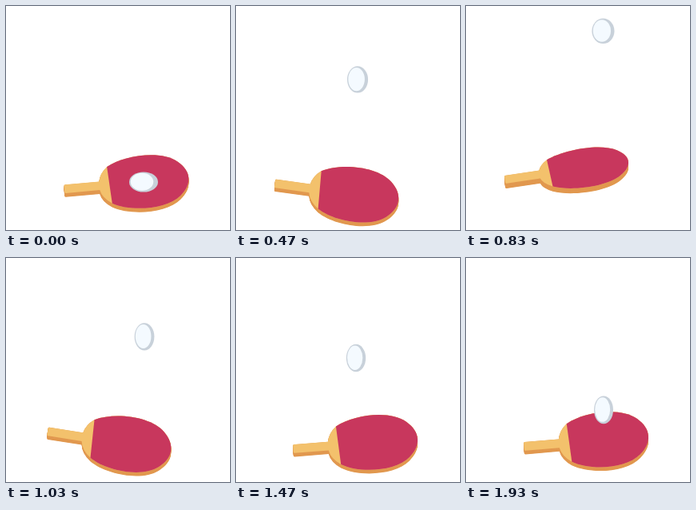
Animation of 280x280 px, one loop 1.96 s. Source, as an HTML page with a canvas:

```html
<!DOCTYPE html>
<html lang="en">
<head>
<meta charset="utf-8">
<title>Table tennis</title>
<style>
  html, body { margin: 0; width: 100%; height: 100%; overflow: hidden; background: #fff; }
  canvas { display: block; width: 280px; height: 280px; }
</style>
</head>
<body>
<canvas id="stage"></canvas>
<script>
const LOOP = 1960, STEP = 100 / 3, SIZE = 280, HIT_Y = 220;
const COLORS = { rubber: '#c8375d', wood: '#f3c16c', edge: '#e1984f', ball: '#f4faff', shade: '#c8d1da' };

// Ball: hit time and x, apex time and y. Paddle: x at the hit, high and low y, pull to the left.
const BOUNCES = [
  { hit: 0, ballX: 172, apex: 285, apexY: 42, x: 172.5, high: 192, low: 240, reach: 22 },
  { hit: 628, ballX: 152, apex: 874, apexY: 26, x: 168.5, high: 190, low: 234, reach: 22 },
  { hit: 1135, ballX: 173, apex: 1310, apexY: 71, x: 171, high: 184, low: 234, reach: 1 },
  { hit: 1570, ballX: 150, apex: 1710, apexY: 71, x: 172.5, high: 199, low: 227, reach: 2 }
];

const canvas = document.getElementById('stage');
const ratio = window.devicePixelRatio || 1;
canvas.width = canvas.height = SIZE * ratio;
const ctx = canvas.getContext('2d');

const clamp = u => Math.max(0, Math.min(1, u));
const smooth = u => { u = clamp(u); return u * u * (3 - 2 * u); };
const mix = (a, b, u) => a + (b - a) * u;

// The current bounce, its neighbours, and how far along it is
function phase(t) {
  const n = BOUNCES.length;
  const i = BOUNCES.findLastIndex(b => t >= b.hit);
  const now = BOUNCES[i], next = BOUNCES[(i + 1) % n], prev = BOUNCES[(i + n - 1) % n];
  const land = next.hit || LOOP;
  return { now, next, prev, land, p: (t - now.hit) / (land - now.hit) };
}

function ballPose(t) {
  const { now, next, land, p } = phase(t);
  const u = t < now.apex ? (now.apex - t) / (now.apex - now.hit) : (t - now.apex) / (land - now.apex);
  const y = mix(now.apexY, HIT_Y, u * u);
  const x = mix(now.ballX, next.ballX, 1 - (1 - p) ** 5);
  // Flat at the hit, tall in flight, rounder at the top of a long flight
  const squash = Math.max(clamp(1 - (t - now.hit) / 105), clamp(1 - (land - t) / 20));
  const round = (land - now.hit) / 230 * clamp(1 - 2.2 * u * u) * smooth((90 - now.apexY) / 40);
  const rx = 12 + 6 * squash + round;
  return { x, y, rx, ry: 15 + (15 - rx) * 0.8 };
}

// Quick upstroke around the hit, then a slow drop
function paddlePose(t) {
  const { now, next, prev, p } = phase(t);
  const rise = q => smooth((q + 0.05) / 0.17);
  let { low, high } = now, lift;
  if (p > 0.95) { lift = rise(p - 1); high = next.high; }
  else if (p < 0.15) { lift = rise(p); low = prev.low; }
  else lift = 1 - smooth((p - 0.15) / 0.73);

  const pull = smooth(p / 0.4) * smooth((1 - p) / 0.25);
  const lean = 0.8 * now.reach * pull * (1 - lift) ** 3;
  const flick = 0.7 * (200 - now.high) * pull * lift ** 2;
  return {
    x: mix(now.x, next.x, p) - now.reach * pull,
    y: mix(low, high, lift),
    tilt: -5.2 + lean - flick,
    half: 34.3 - 12.3 * smooth(lift)
  };
}

function bladeCurve(path, k) {
  path.bezierCurveTo(-20, -37 * k, 25, -38.5 * k, 44, -22 * k);
  path.bezierCurveTo(52, -15 * k, 56, -8 * k, 56, 0);
  path.bezierCurveTo(56, 8 * k, 52, 15 * k, 44, 22 * k);
  path.bezierCurveTo(25, 38.5 * k, -20, 37 * k, -42, 24 * k);
}

function bodyPath(k) {
  const p = new Path2D(), h = 4 + 1.4 * k;
  p.moveTo(-98.5, -h);
  p.lineTo(-56, -h);
  p.quadraticCurveTo(-54, -16 * k, -44.5, -23.5 * k);
  bladeCurve(p, k);
  p.quadraticCurveTo(-54, 16 * k, -56, h);
  p.lineTo(-98.5, h);
  p.quadraticCurveTo(-100, h, -100, h - 1.5);
  p.lineTo(-100, 1.5 - h);
  p.quadraticCurveTo(-100, -h, -98.5, -h);
  return p;
}

function rubberPath(k) {
  const p = new Path2D();
  p.moveTo(-44.5, -23.5 * k);
  bladeCurve(p, k);
  p.closePath();
  return p;
}

function drawPaddle(t) {
  const { x, y, tilt, half } = paddlePose(t);
  const k = half / 34, body = bodyPath(k);
  const layer = (path, color, drop) => {
    ctx.save();
    ctx.translate(x, y + drop);
    ctx.rotate(tilt * Math.PI / 180);
    ctx.fillStyle = color;
    ctx.fill(path);
    ctx.restore();
  };
  for (let drop = 10.4 - half * 0.17; drop > 0; drop -= 0.5) layer(body, COLORS.edge, drop);
  layer(body, COLORS.wood, 0);
  layer(rubberPath(k), COLORS.rubber, 0);
}

function oval(x, y, rx, ry, color) {
  ctx.beginPath();
  ctx.ellipse(x, y, rx, ry, 0, 0, 2 * Math.PI);
  ctx.fillStyle = color;
  ctx.fill();
}

function drawBall(t) {
  const { x, y, rx, ry } = ballPose(t);
  oval(x, y, rx, ry, COLORS.shade);
  oval(x - rx * 0.11, y - ry * 0.02, rx * 0.79, ry * 0.88, COLORS.ball);
}

function draw(time) {
  const t = Math.floor((time % LOOP) / STEP + 0.12) * STEP % LOOP;
  ctx.setTransform(ratio, 0, 0, ratio, 0, 0);
  ctx.fillStyle = '#fff';
  ctx.fillRect(0, 0, SIZE, SIZE);
  drawPaddle(t);
  drawBall(t);
}

const start = performance.now();
function tick() {
  draw(performance.now() - start);
  requestAnimationFrame(tick);
}
tick();
</script>
</body>
</html>
```
